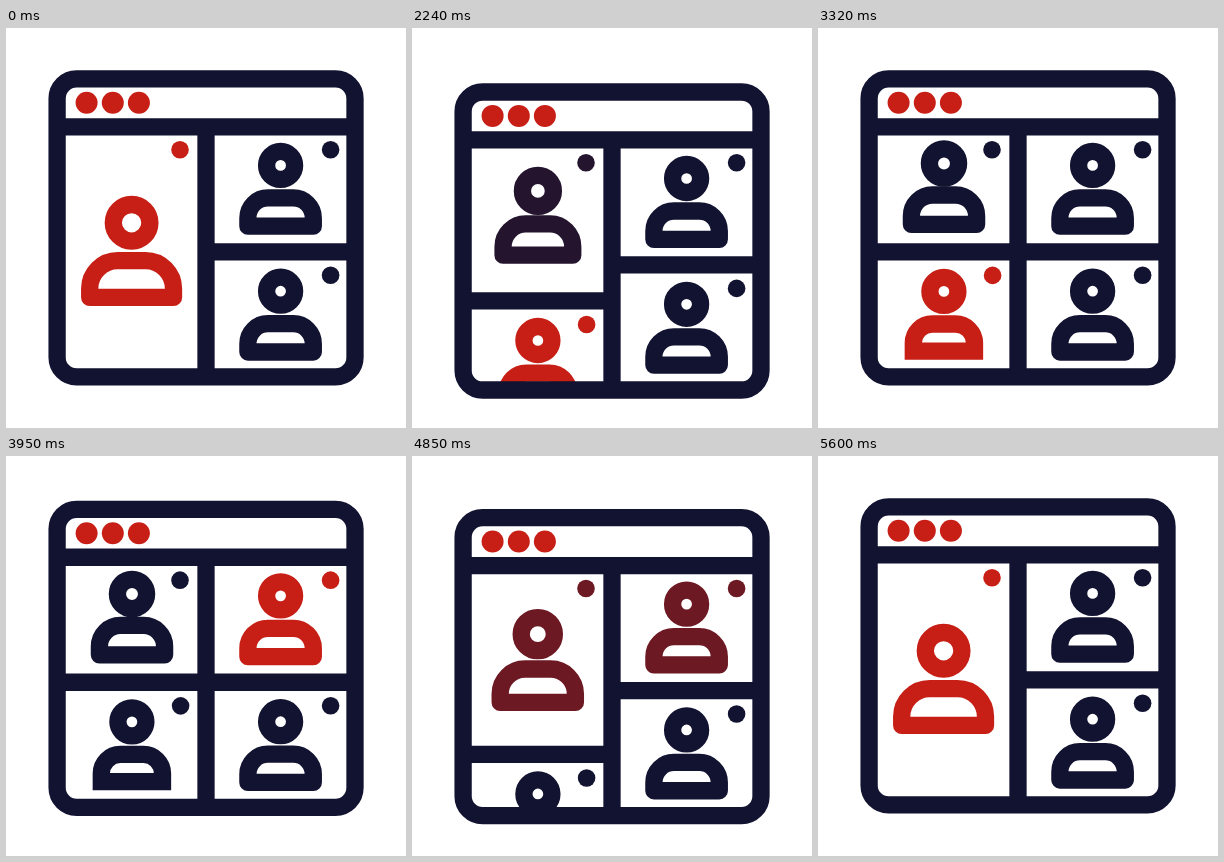
These frames come from a looping animation (400 by 400 pixels, 5630 ms). An HTML page with a canvas:

```html
<!DOCTYPE html>
<html lang="en">
<head>
<meta charset="utf-8">
<title>Video call layout</title>
<style>
  html, body { margin: 0; width: 100%; height: 100%; overflow: hidden; background: #fff; }
  canvas { display: block; width: 400px; height: 400px; }
</style>
</head>
<body>
<canvas id="stage" width="400" height="400"></canvas>
<script>
const ctx = document.getElementById('stage').getContext('2d');

const LOOP = 5630;
const SPLIT = 2000, SWAP = 3600, MERGE = 4700;
const STROKE = 17.3;
const DARK = [18, 19, 49], RED = [199, 31, 22];

// Each person: head centre and radius, body box and top corner radius
const FULL = { x: 125.6, head: 194.8, r: 18.3, half: 41.9, top: 232.6, bottom: 269.4, corner: 28 };
const HALF = { x: 126, head: 135.5, r: 14.6, half: 32.6, top: 167, bottom: 196.4, corner: 21 };
const LOWER = { x: 125.9, head: 263.4, r: 14, half: 30.6, top: 296, bottom: 323.2, corner: 19, join: 'miter' };
const RIGHT = { x: 274.6, head: 137.4, r: 14, half: 32.7, top: 169.9, bottom: 198.2, corner: 20 };

const clamp = v => Math.min(1, Math.max(0, v));
const mix = (a, b, p) => a + (b - a) * p;
const smooth = v => { v = clamp(v); return v * v * (3 - 2 * v); };
const color = p => `rgb(${DARK.map((d, i) => Math.round(mix(d, RED[i], p))).join()})`;

// Cubic easing with flat ends; x1 and x2 are the handle lengths in time
function ease(x1, x2, u) {
  u = clamp(u);
  let lo = 0, hi = 1;
  for (let i = 0; i < 24; i++) {
    const s = (lo + hi) / 2, q = 1 - s;
    if (3 * x1 * s * q * q + 3 * (1 - x2) * s * s * q + s * s * s < u) lo = s; else hi = s;
  }
  return lo * lo * (3 - 2 * lo);
}

const slide = (t, duration) => ease(0.13, 0.8, t / duration);
const fade = t => smooth(t / 300);

function drop(t) {
  if (t <= 0 || t >= 900) return 0;
  return 13.2 * (t < 270 ? ease(0.3, 0.7, t / 270) : 1 - ease(0.25, 0.85, (t - 270) / 610));
}

function nudge(t) {
  return 3 * (t < 270 ? smooth(t / 270) : 1 - smooth((t - 270) / 300));
}

function blend(a, b, p) {
  const out = {};
  for (const key in a) out[key] = mix(a[key], b[key], p);
  return out;
}

function dot(x, y, r, fill) {
  ctx.fillStyle = fill;
  ctx.beginPath();
  ctx.arc(x, y, r, 0, Math.PI * 2);
  ctx.fill();
}

function line(x1, y1, x2, y2) {
  ctx.beginPath();
  ctx.moveTo(x1, y1);
  ctx.lineTo(x2, y2);
  ctx.stroke();
}

function windowPath() {
  ctx.beginPath();
  ctx.roundRect(51.1, 50.9, 297.9, 298, 19.5);
}

function person(p, stroke, dy = 0) {
  const left = p.x - p.half, right = p.x + p.half;
  const top = p.top + dy, bottom = p.bottom + dy;
  ctx.strokeStyle = stroke;
  ctx.lineJoin = p.join || 'round';
  ctx.beginPath();
  ctx.arc(p.x, p.head + dy, p.r, 0, Math.PI * 2);
  ctx.stroke();
  ctx.beginPath();
  ctx.moveTo(left, bottom);
  ctx.arcTo(left, top, p.x, top, p.corner);
  ctx.arcTo(right, top, right, bottom, p.corner);
  ctx.lineTo(right, bottom);
  ctx.closePath();
  ctx.stroke();
}

function lowerPanel(y, stroke, showDot) {
  const shift = y - 223.8;
  ctx.fillStyle = '#fff';
  ctx.fillRect(51, y, 149, 349);
  person(LOWER, stroke, shift);
  if (showDot) dot(174.6, 247.4 + shift, 8.8, stroke);
  ctx.strokeStyle = color(0);
  line(51, y, 200, y);
}

function draw(t) {
  const resize = slide(t - SPLIT, 560) - slide(t - MERGE, 560);
  const reveal = slide(t - SPLIT, 610) - slide(t - MERGE, 610);
  const swap = fade(t - SWAP), merge = fade(t - MERGE);
  const upper = color(1 - fade(t - SPLIT) + merge);
  const lower = color(1 - swap);
  const active = color(swap - merge);
  const lowerOff = t >= 3140 && t < 3320;
  const activeOff = t >= 4310 && t < 4520;
  const dark = color(0), red = color(1);

  ctx.fillStyle = '#fff';
  ctx.fillRect(0, 0, 400, 400);
  ctx.save();
  ctx.translate(0, drop(t - SPLIT) + nudge(t - SWAP) + drop(t - MERGE));
  ctx.lineWidth = STROKE;

  ctx.save();
  windowPath();
  ctx.clip();
  person(blend(FULL, HALF, resize), upper);
  dot(174, 121.7, 8.8, upper);
  lowerPanel(mix(352, 223.8, reveal), lower, !lowerOff);
  ctx.restore();

  person(RIGHT, active);
  if (!activeOff) dot(324.6, 121.7, 8.8, active);
  person(RIGHT, dark, 125.8);
  dot(324.6, 247.3, 8.8, dark);

  ctx.strokeStyle = dark;
  line(200, 223.8, 349, 223.8);
  line(200, 98.8, 200, 349);
  line(51, 98.8, 349, 98.8);
  windowPath();
  ctx.stroke();

  for (const x of [80.6, 106.8, 132.9]) dot(x, 74.8, 11, red);
  ctx.restore();
}

function tick() {
  draw(performance.now() % LOOP);
  requestAnimationFrame(tick);
}
tick();
</script>
</body>
</html>
```
